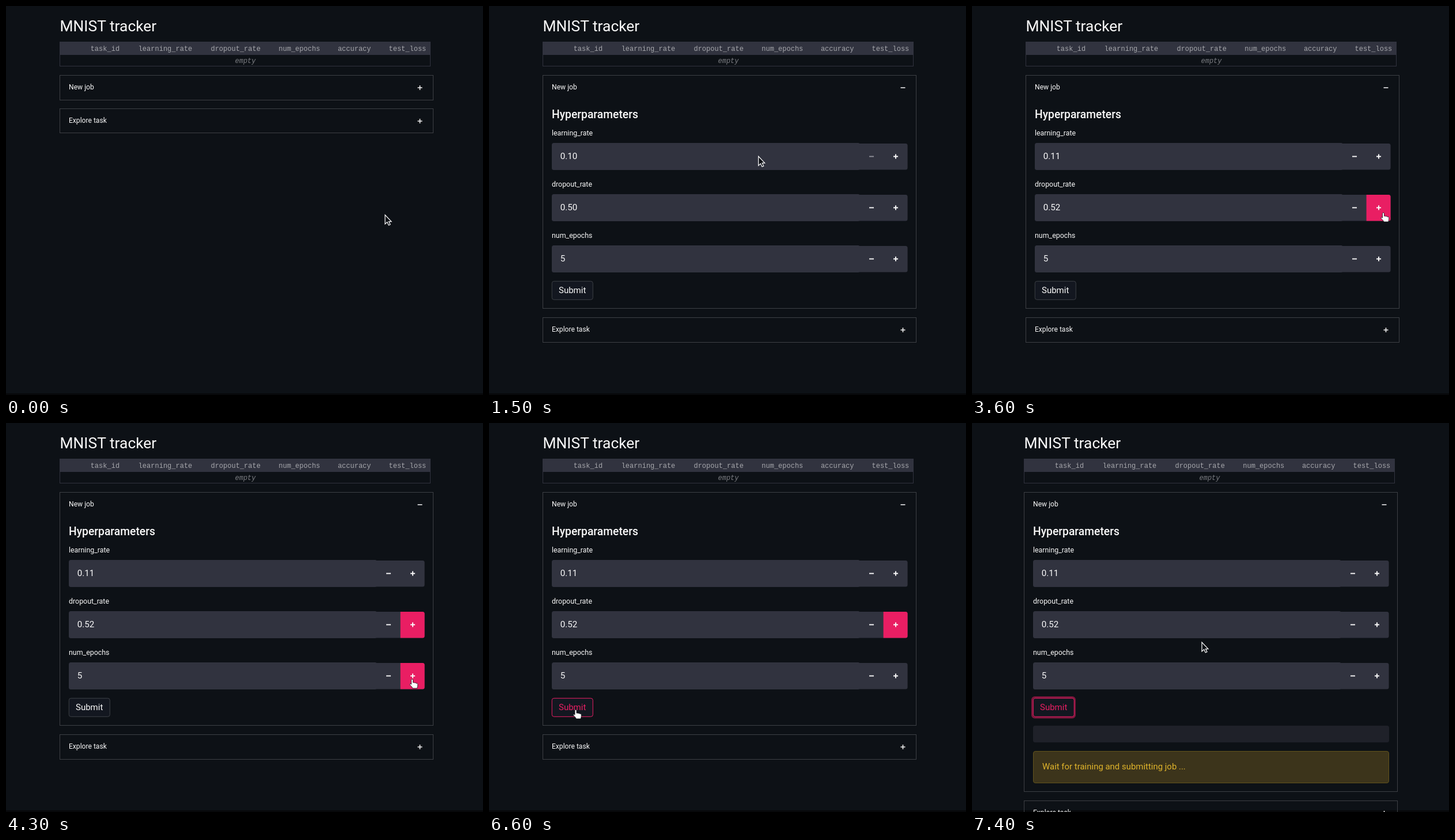
Animation, 828 px wide and 676 px high, one loop 8 s. Source, as an HTML page:

```html
<!DOCTYPE html>
<html lang="en">
<head>
<meta charset="utf-8">
<title>MNIST tracker</title>
<style>
  html, body { margin: 0; width: 100%; height: 100%; overflow: hidden; background: #0d1116; }
  svg { display: block; width: 828px; height: 676px; }
  text { font-family: Roboto, "Noto Sans", sans-serif; white-space: pre; }
  .mono { font-family: "Liberation Mono", "DejaVu Sans Mono", monospace; font-size: 12px; }
</style>
</head>
<body>
<svg id="stage" viewBox="0 0 828 676"></svg>
<script>
const LOOP = 8000, TICK = 100;
const BACK = '#0d1116', WHITE = '#fafafa', PINK = '#e91e63', LINE = '#3d4045', FIELD = '#31333f';
const stage = document.getElementById('stage');

// Layout of the three number inputs
const rowTop = i => 238 + Math.round(89.2 * i);
const MINUS = 643, PLUS = 685, BUTTON = 42;
const overPlus = i => [PLUS + 29, rowTop(i) + 32];

// Where the pointer rests, and the moves between: leave, arrive, spot
const home = [658, 363], job = [639.5, 142], field = [399, 309], label = [643, 291];
const minus = [683, 444.5], lastPlus = [705, 445], aside = [235, 487], send = [150.5, 498], end = [399, 381];
const moves = [
  [200, 600, job], [1000, 1700, field], [1700, 1900, label], [2000, 2200, overPlus(0)],
  [2900, 3200, overPlus(1)], [3900, 4300, lastPlus], [4900, 5200, minus], [5400, 5700, lastPlus],
  [6000, 6300, aside], [6400, 6600, send], [6800, 7400, end]
];

function pointerAt(t) {
  let from = home;
  for (const [leave, arrive, spot] of moves) {
    if (t <= leave) break;
    const k = Math.min(1, (t - leave) / (arrive - leave));
    from = from.map((v, i) => v + (spot[i] - v) * k);
  }
  return from;
}

const text = (s, x, y, size, fill = WHITE, extra = '') =>
  `<text x="${x}" y="${y}" font-size="${size}" fill="${fill}" ${extra}>${s}</text>`;
const rect = (x, y, w, h, fill, stroke = 'none', r = 0, extra = '') =>
  `<rect x="${x}" y="${y}" width="${w}" height="${h}" rx="${r}" fill="${fill}" stroke="${stroke}" ${extra}/>`;
const shape = (d, fill, stroke = 'none', width = 1) =>
  `<path d="${d}" fill="${fill}" stroke="${stroke}" stroke-width="${width}"/>`;

function sign(x, y, plus, color, r = 4, width = 1.9) {
  return shape(`M${x - r} ${y}h${2 * r}` + (plus ? `M${x} ${y - r}v${2 * r}` : ''), 'none', color, width);
}

function expander(title, y, h, open, hot) {
  const color = hot ? PINK : WHITE;
  return rect(93.5, y + .5, 648, h, 'none', LINE)
    + text(title, 109, y + 25, 12.1, color)
    + sign(718.5, y + 22, !open, color, 4, 1.5);
}

function table() {
  let x = 116.5;
  const heads = 'task_id learning_rate dropout_rate num_epochs accuracy test_loss'.split(' ').map(s =>
    text(s, x += 7.6 * s.length + 27.4, 78, 12, '#a6a7ac', 'class="mono" text-anchor="end"'));
  return text('MNIST tracker', 93.5, 43.5, 26.4)
    + rect(93.5, 62.5, 643, 42, 'none', FIELD)
    + rect(93, 62, 644, 23, FIELD)
    + heads.join('')
    + text('empty', 415.5, 99, 12, '#7b7d82', 'class="mono" text-anchor="middle" font-style="italic"');
}

function numberInput(y, name, value, minusHot, plusHot, disabled) {
  const mid = y + 23.5;
  return text(name, 109, y - 13, 12.4)
    + rect(109, y, 535, 47, FIELD, 'none', 3.5)
    + rect(640, y + 1, 86.6, 45.6, FIELD, 'none', 3.5)
    + (minusHot ? rect(MINUS, y + 1, BUTTON, 45.6, PINK) : '')
    + (plusHot ? shape(`M684.6 ${y + 1}h38.5q3.5 0 3.5 3.5v38.6q0 3.5-3.5 3.5h-38.5z`, PINK) : '')
    + text(value, 123.7, y + 28, 15.2)
    + sign(664, mid, false, disabled ? '#8f9098' : WHITE)
    + sign(706, mid, true, WHITE);
}

function submit(hot, focus) {
  return (focus ? rect(107.5, 476.5, 74, 35.5, 'none', PINK, 4.5, 'stroke-width="3" stroke-opacity=".5"') : '')
    + rect(109.3, 478.3, 71, 32, '#131720', hot ? PINK : LINE, 3.5)
    + text('Submit', 121, 499.3, 15, hot ? PINK : WHITE);
}

function notice() {
  return rect(109, 526, 618, 29, '#1f2129', 'none', 3.5)
    + rect(109.5, 570.5, 617, 55, '#3c341b', '#62531c', 3.5)
    + text('Wait for training and submitting job ...', 125, 602.3, 14.95, '#e0b42b');
}

function pointer(x, y, hand) {
  const d = hand
    ? 'M3 2C3-.4 6-.4 6 2V6.2C8 5.6 8.6 6.4 8.8 6.6 10.4 6 11.2 6.8 11.5 7.4 13.3 6.8 14.2 8 14.2 9.2V12C14.2 13.5 13.4 14.5 13.2 16H5.4C4.5 13.5 2 11.5 .6 9.9-.3 8.6 1.2 7.4 3 9.2Z'
    : 'M0 0V16L3.7 12.6 6.3 18 9 16.8 6.5 11.6H11Z';
  return `<g transform="translate(${hand ? x - 4.5 : x} ${y})">`
    + (hand ? shape(d, '#fff', BACK, .8) : shape(d, BACK, '#fff', 1.2)) + '</g>';
}

function render(t) {
  const [x, y] = pointerAt(t);
  const inside = (l, top, w, h) => x >= l && x < l + w && y >= top && y < top + h;
  const open = t >= 900, waiting = t >= 7000, focus = t >= 6700;
  const bottom = !open ? 163 : t < 1000 ? 510 : waiting ? 640 : 525;
  const next = bottom + (open ? 16 : 15);

  const overJob = inside(93, 120, 649, 43);
  const overTask = inside(93, next, 649, 43);
  const overSubmit = open && inside(109, 478, 72, 33);
  let hand = overJob || overTask || overSubmit;

  const rate = t < 2300 ? .1 : .11;
  const dropout = t < 3400 ? .5 : t < 3500 ? .51 : .52;
  const held = t >= 3400 && t < 6700;   // the clicked button keeps its colour
  let form = '';
  if (open) {
    const values = { learning_rate: rate.toFixed(2), dropout_rate: dropout.toFixed(2), num_epochs: '5' };
    form = text('Hyperparameters', 109, 195, 19.3, WHITE, 'font-weight="500"');
    Object.entries(values).forEach(([name, value], i) => {
      const top = rowTop(i);
      const less = inside(MINUS, top, BUTTON, 47), more = inside(PLUS, top, BUTTON, 47);
      hand = hand || less || more;
      form += numberInput(top, name, value, less, more || (i === 1 && held), value === '0.10');
    });
    form += submit(overSubmit || focus, focus) + (waiting ? notice() : '');
  }

  stage.innerHTML = rect(0, 0, 828, 676, BACK)
    + rect(0, 673, 828, 3, '#07090b')
    + `<g transform="translate(${waiting ? -3 : 0} 0)">`
    + table()
    + expander('New job', 120, bottom - 120, open, overJob)
    + form
    + expander('Explore task', next, open ? 43 : 42, false, overTask)
    + '</g>' + pointer(x, y, hand);
}

let start, last = -1;
function frame(now) {
  start ??= now;
  const t = Math.floor((now - start) % LOOP / TICK) * TICK;
  if (t !== last) render(last = t);
  requestAnimationFrame(frame);
}
render(0);
requestAnimationFrame(frame);
</script>
</body>
</html>
```
